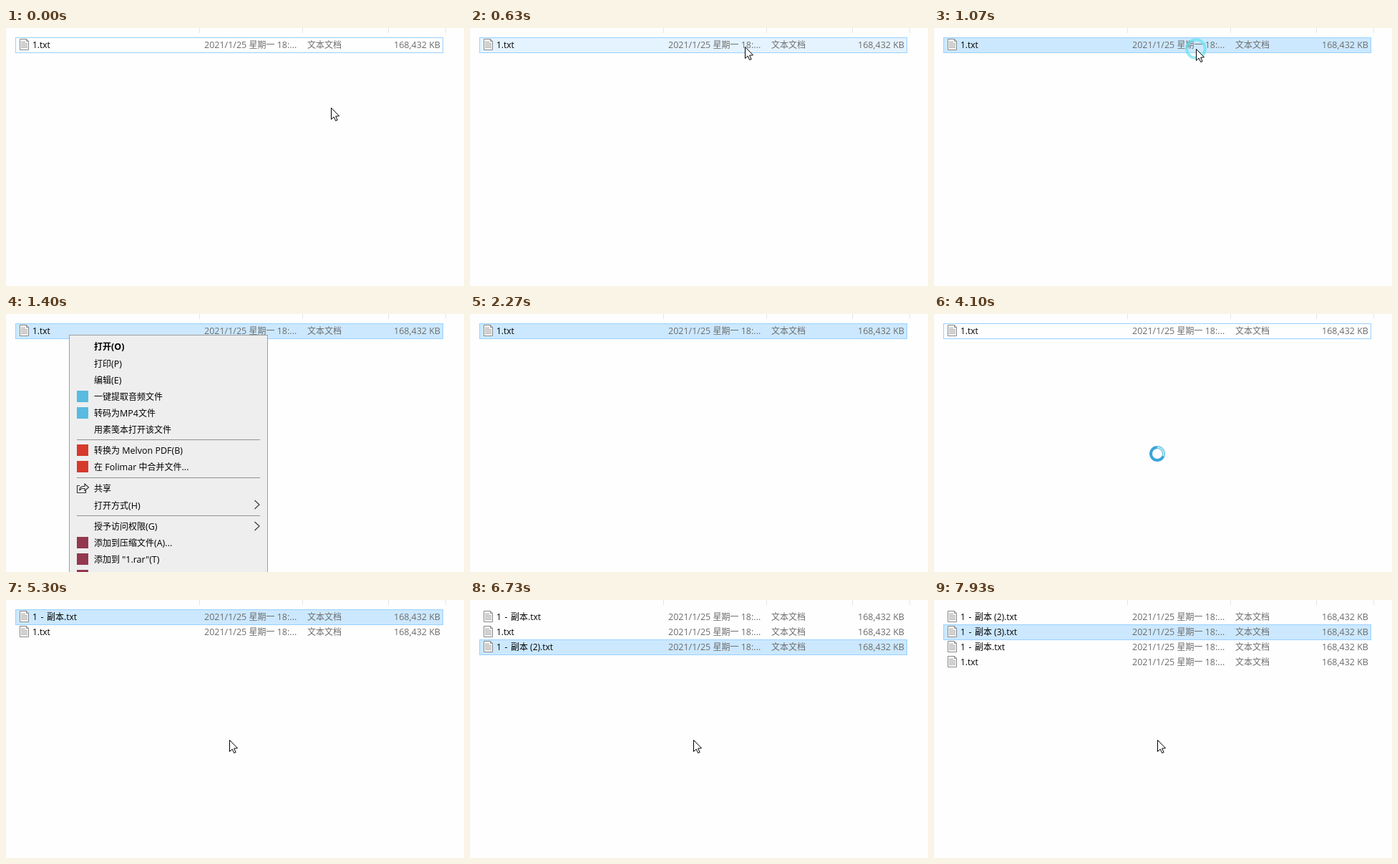
Animation, 640 px wide and 360 px high, one loop 8 s. Source, as an HTML page with a canvas:

```html
<!DOCTYPE html>
<html lang="zh-CN">
<head>
<meta charset="utf-8">
<style>
html, body { margin: 0; width: 100%; height: 100%; overflow: hidden; background: #fefefe; }
canvas { display: block; width: 100%; height: 100%; }
</style>
</head>
<body>
<canvas id="stage" width="640" height="360"></canvas>
<script>
const ctx = document.getElementById('stage').getContext('2d');
const LOOP = 8000;
const ROW_H = 21;
const LATIN = '"Open Sans", "Noto Sans", sans-serif';
const CJK = '12px "Noto Sans CJK SC", "Noto Sans CJK", sans-serif';

const PAPER = '#fefefe', SELECTED = '#cce8ff', HOVER = '#e5f3ff', EDGE = '#99d1ff';
const GRAY = '#6d6d6d', BLUE = '#58bbdf', RED = '#d63a2c', WINE = '#93384f';

const clamp = v => Math.max(0, Math.min(1, v));
const ease = v => v * v * (3 - 2 * v);

// Chinese and Latin runs use different faces and sizes.
function drawText(str, x, y, { color = '#000', bold = false, size = 12.5, gap = 0 } = {}) {
  ctx.fillStyle = color;
  ctx.wordSpacing = gap + 'px';
  for (const run of str.match(/[\u4e00-\u9fff]+|[^\u4e00-\u9fff]+/g)) {
    const face = run.charCodeAt(0) >= 0x4e00 ? CJK : `${size}px ${LATIN}`;
    ctx.font = (bold ? 'bold ' : '') + face;
    ctx.fillText(run, x, y);
    x += ctx.measureText(run).width;
  }
}

function rect(x, y, w, h, color) {
  ctx.fillStyle = color;
  ctx.fillRect(x, y, w, h);
}

function frame(x, y, w, h, color) {
  ctx.strokeStyle = color;
  ctx.lineWidth = 1;
  ctx.strokeRect(x + 0.5, y + 0.5, w - 1, h - 1);
}

function line(points, color, width = 1) {
  ctx.strokeStyle = color;
  ctx.lineWidth = width;
  ctx.beginPath();
  for (const [x, y] of points) ctx.lineTo(x, y);
  ctx.stroke();
}

function arc(x, y, r, color, width, from = 0, to = Math.PI * 2) {
  ctx.strokeStyle = color;
  ctx.lineWidth = width;
  ctx.beginPath();
  ctx.arc(x, y, r, from, to);
  ctx.stroke();
}

function polygon(points, x, y, fill, stroke) {
  ctx.beginPath();
  for (const [px, py] of points) ctx.lineTo(x + px + 0.5, y + py + 0.5);
  ctx.closePath();
  ctx.fillStyle = fill;
  ctx.fill();
  ctx.strokeStyle = stroke;
  ctx.lineWidth = 1;
  ctx.stroke();
}

const PAGE = [[0, 0], [9, 0], [12, 3], [12, 15], [0, 15]];

function fileIcon(x, y) {
  polygon(PAGE, x, y, '#fff', '#858585');
  line([[x + 9.5, y + 0.5], [x + 9.5, y + 3.5], [x + 12.5, y + 3.5]], '#858585');
  for (let i = 0; i < 5; i++) rect(x + 2, y + 4 + i * 2, i ? 9 : 6, 1, '#a2a2a2');
}

function row(index, name, fill, outlined) {
  const y = 13 + index * ROW_H;
  if (fill) rect(13, y, 598, 22, fill);
  if (fill || outlined) frame(13, y, 598, 22, EDGE);
  fileIcon(19, y + 2);
  drawText(name, 37, y + 15, { size: 12, gap: 1.5 });
  drawText('2021/1/25 星期一 18:...', 277, y + 15, { color: GRAY });
  drawText('文本文档', 421, y + 15, { color: GRAY });
  drawText('168,432 KB', 542, y + 15, { color: GRAY });
}

function shareIcon(y) {
  line([[103, y - 3.5], [99.5, y - 3.5], [99.5, y + 6.5], [111.5, y + 6.5], [111.5, y + 3]], '#333', 1.1);
  line([[102.5, y + 3], [104, y - 1], [107, y - 2.5], [110, y - 2.5], [110, y - 6],
    [115.5, y - 1], [110, y + 3.5], [110, y + 0.5], [106, y + 0.5], [102.5, y + 3]], '#333', 1.1);
}

const MENU = [
  [45, '打开(O)'], [69, '打印(P)'], [92, '编辑(E)'],
  [115, '一键提取音频文件', BLUE], [138, '转码为MP4文件', BLUE],
  [161, '用素笺本打开该文件'],
  [190, '转换为 Melvon PDF(B)', RED], [213, '在 Folimar 中合并文件...', RED],
  [243, '共享'], [267, '打开方式(H)'], [296, '授予访问权限(G)'],
  [319, '添加到压缩文件(A)...', WINE], [342, '添加到 "1.rar"(T)', WINE],
  [365, '', WINE]
];

function menu() {
  rect(88, 29, 278, 340, '#eeeeee');
  frame(88, 29, 278, 340, '#a0a0a0');
  for (const [y, label, color] of MENU) {
    if (color) rect(99, y - 8, 16, 16, color);
    if (label) drawText(label, 123, y + 5, { bold: y === 45 });
  }
  for (const y of [175, 228, 281]) rect(99, y, 256, 1, '#919191');
  for (const y of [266, 296]) line([[347.5, y - 6], [354, y], [347.5, y + 6]], '#333', 1.1);
  shareIcon(243);
}

// Pointer path: start time, end time, destination.
const START = [454, 111];
const MOVES = [
  [10, 270, 384, 26],
  [610, 910, 366, 29],
  [1100, 1390, 290, 385],
  [2270, 2800, 312, 195]
];

function pointerAt(t) {
  let [x, y] = START;
  for (const [from, to, tx, ty] of MOVES) {
    const k = ease(clamp((t - from) / (to - from)));
    x += (tx - x) * k;
    y += (ty - y) * k;
  }
  return [Math.round(x), Math.round(y)];
}

const ARROW = [[0, 0], [0, 16], [3.7, 12.6], [6.2, 18], [8.6, 17], [6.2, 11.7], [11, 11.3]];

function busy(x, y) {
  arc(x, y, 9, '#3aa5d8', 4);
  arc(x, y, 9, '#a8e2f2', 3, -1.6, 0.4);
}

// Click rings widen and fade at the same pace for both buttons.
const RIGHT_CLICK = 920, LEFT_CLICK = 2830, RING_LIFE = 440;

function ring(age, x, y, rgb) {
  if (age < 0 || age > RING_LIFE) return;
  arc(x, y, 6 + age * 0.045, `rgba(${rgb},${1 - age / RING_LIFE})`, 4);
}

const BUSY = [[4100, 4130], [5270, 5300], [6700, 6730], [7870, 7930]];

function files(t, pointerY) {
  if (t < 4830) {
    const selected = t >= RIGHT_CLICK && t < LEFT_CLICK;
    const hovered = t < RIGHT_CLICK && pointerY < 35;
    row(0, '1.txt', selected ? SELECTED : hovered ? HOVER : null, true);
    return;
  }
  let names = ['1 - 副本.txt', '1.txt'], active = 0;
  if (t >= 7400) {
    names = ['1 - 副本 (2).txt', '1 - 副本 (3).txt', ...names];
    active = 1;
  } else if (t >= 5900) {
    names.push('1 - 副本 (2).txt');
    active = 2;
  }
  names.forEach((name, i) => { if (i !== active) row(i, name); });
  row(active, names[active], SELECTED);
}

function draw(t) {
  rect(0, 0, 640, 360, PAPER);
  for (const x of [270, 414, 534, 614]) rect(x, 0, 1, 7, '#e5e5e5');
  const [x, y] = pointerAt(t);
  files(t, y);
  if (t >= 1120 && t < 2270) menu();
  ring(t - RIGHT_CLICK, 366, 29, '90,225,235');
  ring(t - LEFT_CLICK, 312, 195, '60,235,30');
  if (BUSY.some(([from, to]) => t >= from && t < to)) busy(x, y);
  else polygon(ARROW, x, y, '#fff', '#000');
}

function tick() {
  draw(performance.now() % LOOP);
  requestAnimationFrame(tick);
}
tick();
</script>
</body>
</html>
```
